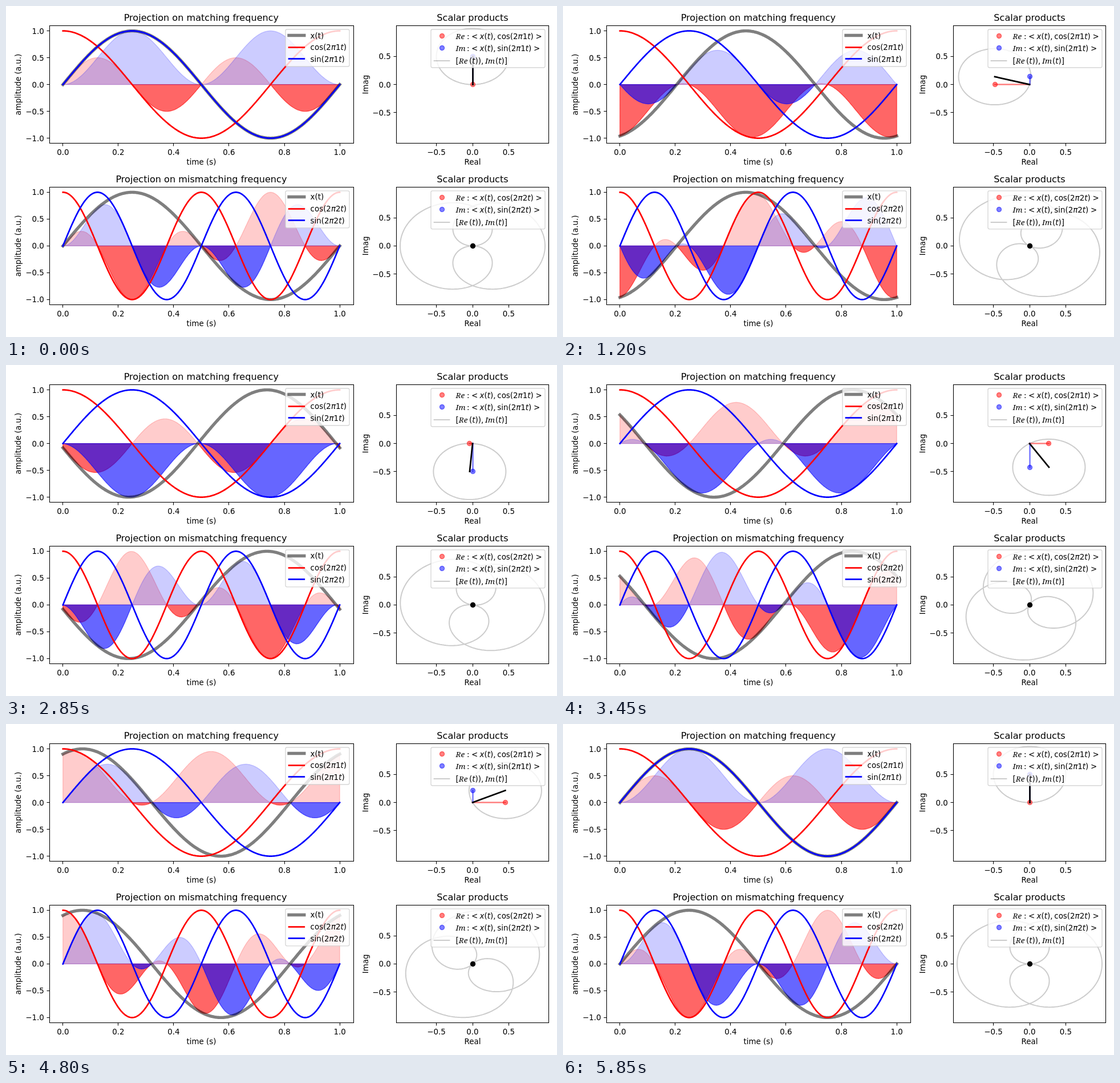
Recreate the animation shown at these times as an HTML page. Size 966 by 580 pixels, loop 6000 ms.

```html
<!DOCTYPE html>
<html lang="en">
<head>
<meta charset="utf-8">
<title>Projection on matching and mismatching frequency</title>
<style>
  html, body { margin: 0; width: 100%; height: 100%; overflow: hidden; background: #fff; }
  svg { display: block; }
  text { font: 13.4px "DejaVu Sans", sans-serif; fill: #000; white-space: pre; }
  .title { font-size: 16.1px; }
  .mid { text-anchor: middle; }
  .end { text-anchor: end; }
  .it { font-style: oblique; }
  .script { font-family: "Noto Serif", serif; font-style: italic; }
  .line { fill: none; stroke-linejoin: round; stroke-linecap: square; }
  .axis { fill: none; stroke: #000; stroke-width: 1.07; }
</style>
</head>
<body>
<svg id="stage" width="966" height="580" viewBox="0 0 966 580"></svg>
<script>
const NS = 'http://www.w3.org/2000/svg';
const stage = document.getElementById('stage');
const PT = 1.342, TAU = 2 * Math.PI;
const STEPS = 40, STEP_MS = 150, SAMPLES = 400, ROW = 282.8;
const ts = Array.from({ length: SAMPLES + 1 }, (_, i) => i / SAMPLES);
const snap = v => Math.floor(v) + .5;

function add(parent, tag, attrs) {
  const el = document.createElementNS(NS, tag);
  for (const k in attrs) el.setAttribute(k, attrs[k]);
  parent.appendChild(el);
  return el;
}

function label(parent, x, y, str, cls = '', extra = {}) {
  const el = add(parent, 'text', { x, y: Math.round(y), class: cls, ...extra });
  el.textContent = str;
  return el;
}

// Mixed upright and slanted text: parts between underscores are slanted.
function math(parent, x, y, str) {
  const el = label(parent, x, y, '');
  str.split('_').forEach((part, i) => {
    if (part) add(el, 'tspan', { class: i % 2 ? 'it' : '' }).textContent = part;
  });
  return el;
}

function line(parent, color, pt, alpha = 1) {
  return add(parent, 'path', {
    class: 'line', stroke: color, 'stroke-width': pt * PT, 'stroke-opacity': alpha
  });
}

function area(parent, color, alpha) {
  return add(parent, 'path', {
    fill: color, stroke: color, 'stroke-width': PT, 'fill-opacity': alpha, 'stroke-opacity': alpha
  });
}

function dot(parent, color, alpha, x = 0, y = 0) {
  const el = add(parent, 'circle', {
    r: 3 * PT, fill: color, stroke: color, 'stroke-width': PT,
    'fill-opacity': alpha, 'stroke-opacity': alpha
  });
  place(el, x, y);
  return el;
}

function place(el, x, y) {
  el.setAttribute('cx', snap(x));
  el.setAttribute('cy', snap(y));
}

const path = pts => 'M' + pts.map(p => p[0].toFixed(2) + ' ' + p[1].toFixed(2)).join('L');

function frame(x0, x1, y0, y1, xTicks, yTicks, px, py) {
  add(stage, 'rect', { x: x0, y: y0, width: x1 - x0, height: y1 - y0, class: 'axis' });
  const name = v => v.toFixed(1).replace('-', '\u2212');
  for (const v of xTicks) {
    const x = px(v);
    add(stage, 'path', { d: `M${snap(x)} ${y1}v5`, class: 'axis' });
    label(stage, x, y1 + 20.5, name(v), 'mid');
  }
  for (const v of yTicks) {
    const y = py(v);
    add(stage, 'path', { d: `M${x0} ${snap(y)}h-5`, class: 'axis' });
    label(stage, x0 - 9.7, y + 5, name(v), 'end');
  }
}

function sideLabel(x, y, str) {
  label(stage, 0, 0, str, 'mid', { transform: `translate(${x} ${y}) rotate(-90)` });
}

function legendBox(x, y, width, height) {
  const g = add(stage, 'g', {});
  add(g, 'rect', {
    x, y, width, height, rx: 2.7, fill: '#fff', 'fill-opacity': .8,
    stroke: '#ccc', 'stroke-opacity': .8, 'stroke-width': PT
  });
  return g;
}

function clip(id, x0, x1, y0, y1) {
  const c = add(stage, 'clipPath', { id });
  add(c, 'rect', { x: x0, y: y0, width: x1 - x0, height: y1 - y0 });
  return add(stage, 'g', { 'clip-path': `url(#${id})` });
}

function wavePanel(freq, dy, title) {
  const top = snap(34.3 + dy), bottom = snap(240.8 + dy);
  const zero = 137.6 + dy;
  const px = t => 99.8 + 485.3 * t, py = v => zero - 94 * v;
  const g = clip('wave' + freq, 76, 610, top, bottom);
  const fills = [['red', .2], ['red', .6], ['blue', .2], ['blue', .6]].map(a => area(g, ...a));
  const curve = f => path(ts.map(t => [px(t), py(f(t))]));
  const signal = line(g, '#000', 4, .5);
  const cos = t => Math.cos(TAU * freq * t), sin = t => Math.sin(TAU * freq * t);
  line(g, 'red', 2).setAttribute('d', curve(cos));
  line(g, 'blue', 2).setAttribute('d', curve(sin));

  // One closed shape for each stretch where f has the given sign.
  function lobes(f, sign) {
    const runs = [];
    let run = null;
    for (const t of ts) {
      if (f(t) * sign > 1e-9) {
        if (!run) runs.push(run = []);
        run.push(t);
      } else run = null;
    }
    return runs.map(r => path([
      [px(r[0]), zero],
      ...r.map(t => [px(t), py(f(t))]),
      [px(r[r.length - 1]), zero]
    ]) + 'Z').join('');
  }

  frame(76.5, 609.5, top, bottom, [0, .2, .4, .6, .8, 1], [1, .5, 0, -.5, -1], px, py);
  label(stage, 342.4, 26 + dy, title, 'title mid');
  label(stage, 342.4, 277.8 + dy, 'time (s)', 'mid');
  sideLabel(26, zero, 'amplitude (a.u.)');

  const box = legendBox(490, 41 + dy, 112, 65);
  [['#000', 4, .5, 51.6, 'x(t)'],
   ['red', 2, 1, 72.2, `cos(2_π_${freq}_t_)`],
   ['blue', 2, 1, 92.8, `sin(2_π_${freq}_t_)`]].forEach(([color, pt, alpha, y, str]) => {
    line(box, color, pt, alpha).setAttribute('d', `M496 ${snap(y + dy)}h26.8`);
    math(box, 533.6, y + dy + 5, str);
  });

  return x => {
    signal.setAttribute('d', curve(x));
    [cos, sin].forEach((wave, i) => {
      const product = t => x(t) * wave(t);
      fills[2 * i].setAttribute('d', lobes(product, 1));
      fills[2 * i + 1].setAttribute('d', lobes(product, -1));
    });
  };
}

function planePanel(freq, dy) {
  const top = snap(34.3 + dy), bottom = snap(240.8 + dy);
  const zero = 137.6 + dy;
  const px = v => 818 + 127 * v, py = v => zero - 98.4 * v;
  const g = clip('plane' + freq, 684, 952, top, bottom);
  const orbit = line(g, '#000', 1.5, .2);
  const match = freq === 1;
  let parts;
  if (match) {
    parts = {
      re: line(g, 'red', 2, .5), im: line(g, 'blue', 2, .5),
      reDot: dot(g, 'red', .5), imDot: dot(g, 'blue', .5), sum: line(g, '#000', 2)
    };
  } else {
    dot(g, '#000', 1, px(0), py(0));
  }

  frame(684.5, 951.5, top, bottom, [-.5, 0, .5], [.5, 0, -.5], px, py);
  label(stage, 818, 26 + dy, 'Scalar products', 'title mid');
  label(stage, 818, 277.8 + dy, 'Real', 'mid');
  sideLabel(635.2, zero, 'Imag');

  const box = legendBox(745, 41 + dy, 200, 67);
  [['red', 52.8, 'Re', 'cos'], ['blue', 73.8, 'Im', 'sin']].forEach(([color, y, part, fn]) => {
    const base = y + dy + 5.2;
    dot(box, color, .5, 764, y + dy);
    label(box, 788.5, base, part, 'script');
    label(box, 808, base, ':');
    label(box, 816, base, '<');
    math(box, 830.5, base, '_x_(_t_),');
    const end = math(box, 861.3, base, `${fn}(2_π_${freq}_t_)`);
    add(end, 'tspan', { dx: 3.7 }).textContent = '>';
  });
  const base = 101 + dy;
  line(box, '#000', 1.5, .2).setAttribute('d', `M750.6 ${Math.round(95.8 + dy)}h26.8`);
  label(box, 788.5, base, '[');
  label(box, 793.8, base, 'Re', 'script');
  math(box, 812, base, '(_t_)),');
  label(box, 840, base, 'Im', 'script');
  math(box, 858, base, '(_t_)]');

  return (x, phase) => {
    orbit.setAttribute('d', path(ts.map(t => {
      const a = TAU * freq * t;
      return [px(x(t) * Math.cos(a)), py(x(t) * Math.sin(a))];
    })));
    if (!match) return;
    const re = px(-Math.sin(phase) / 2), im = py(Math.cos(phase) / 2);
    const x0 = snap(px(0)), y0 = snap(zero);
    parts.re.setAttribute('d', path([[px(0), y0], [re, y0]]));
    parts.im.setAttribute('d', path([[x0, zero], [x0, im]]));
    const upright = Math.abs(re - px(0)) < .01;
    parts.sum.setAttribute('d', path(upright ? [[x0, zero], [x0, im]] : [[px(0), zero], [re, im]]));
    place(parts.reDot, re, zero);
    place(parts.imDot, px(0), im);
  };
}

const panels = [
  wavePanel(1, 0, 'Projection on matching frequency'),
  planePanel(1, 0),
  wavePanel(2, ROW, 'Projection on mismatching frequency'),
  planePanel(2, ROW)
];

let shown = -1;
function draw(now) {
  const step = Math.floor(Math.max(0, now - start) / STEP_MS) % STEPS;
  if (step !== shown) {
    shown = step;
    const phase = TAU * step / (STEPS - 1);
    const x = t => Math.sin(TAU * t - phase);
    panels.forEach(update => update(x, phase));
  }
  requestAnimationFrame(draw);
}
const start = performance.now();
draw(start);
</script>
</body>
</html>
```
